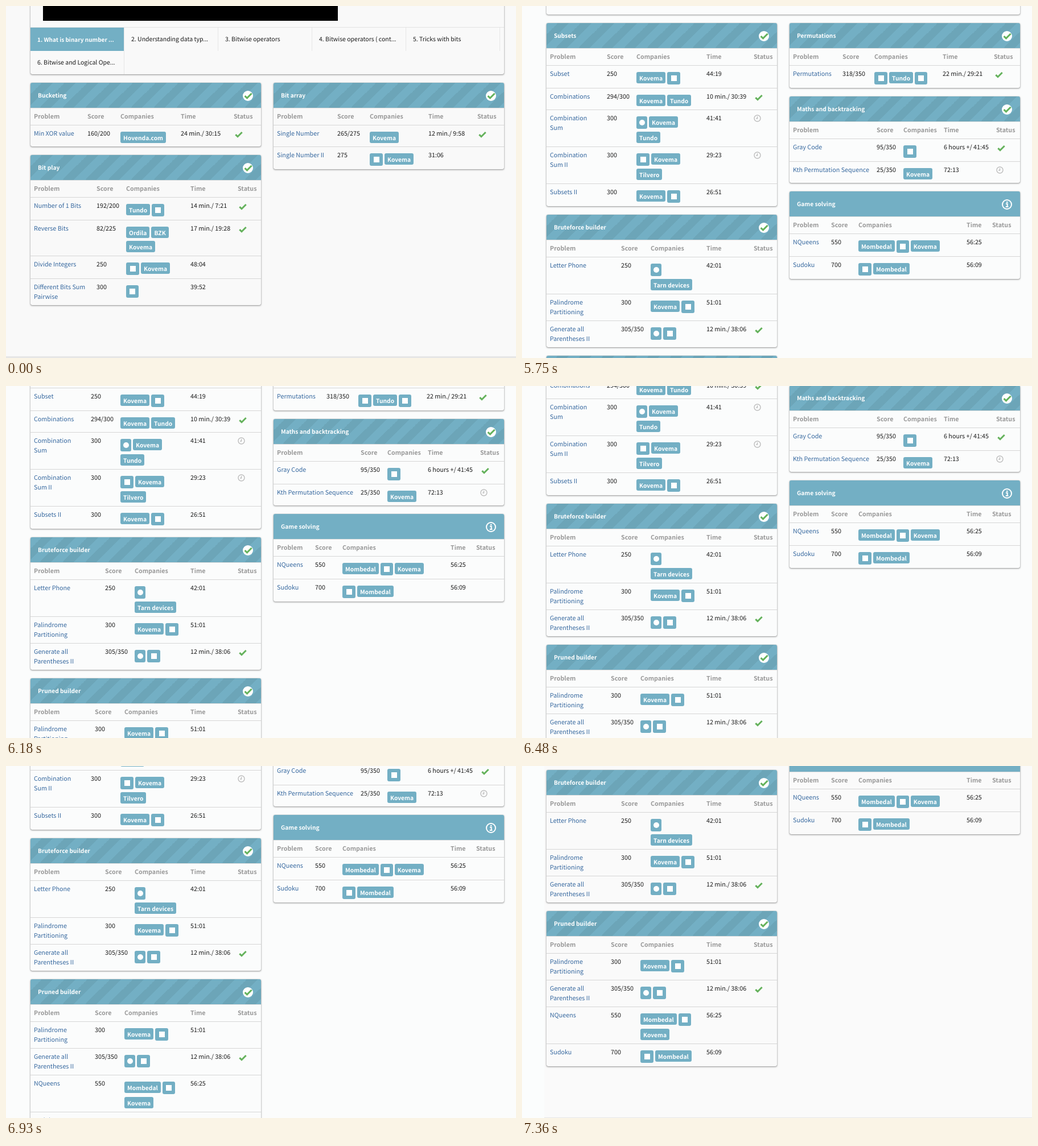
Write an HTML page that moves like this. It is 896 px wide and 619 px high and loops after 8 s.

```html
<!DOCTYPE html>
<html lang="en">
<head>
<meta charset="utf-8">
<title>Practice problems</title>
<style>
html, body { margin: 0; width: 100%; height: 100%; overflow: hidden; }
body {
  position: relative; color: #1a1a1a; white-space: nowrap;
  font: 10.74px/17px "Noto Sans CJK JP", "Noto Sans CJK SC", "Noto Sans CJK", "Open Sans", sans-serif;
  text-rendering: geometricPrecision;
}
.scene, .col, .box, .bar { position: absolute; }
.scene { left: 0; top: 0; width: 896px; height: 619px; }
.col { width: 405px; }
.left { left: 43px; }
.right { left: 470px; }
.box, .panel { border-radius: 3px; box-shadow: 0 0 1px rgba(0,0,0,.45), 0 1px 3px rgba(0,0,0,.4); }
.panel { margin-bottom: 15px; }
.title {
  position: relative; height: 44px; padding-left: 13px; border-radius: 3px 3px 0 0;
  background-color: #73afc4; color: #fff; font-weight: 700; font-size: 10.2px; line-height: 44px;
}
.striped {
  background-image: linear-gradient(-45deg, rgba(0,0,0,.06) 25%, transparent 25% 50%, rgba(0,0,0,.06) 50% 75%, transparent 75%);
  background-size: 40px 40px;
}
.title svg { position: absolute; right: 13px; top: 13px; }
svg { display: block; fill: none; }
.row, .head { display: grid; align-items: start; }
.row { border-top: 1px solid #d6d6d6; }
.head {
  box-sizing: border-box; height: 30px; border-top: 1px solid #ddd;
  color: #999; font-weight: 700; line-height: 30px;
}
.row > div { padding: 6px 0; }
.row > div:first-child, .head > div:first-child { padding-left: 6px; }
.link, .row > div:first-child { color: #36689f; }
.row > .tags { padding: 11px 0 1px; }
.line { display: flex; align-items: flex-start; gap: 3px; padding-bottom: 5px; }
.tag {
  height: 20px; padding: 0 5px; border-radius: 3px; background: #73afc4;
  color: #fff; font-weight: 700; font-size: 10.3px; line-height: 21px;
}
.icon { height: 22px; border-radius: 3px; background: #73afc4; display: grid; place-items: center; }
.icon i { width: 10px; height: 10px; background: #fff; }
.row > .status { padding: 0; }
.status .check { margin: 10px 0 0 2px; }
.status .clock { margin-top: 8px; }
.tabs { position: absolute; left: 0; top: 37px; width: 832px; border-top: 1px solid #e3e3e3; display: flex; flex-wrap: wrap; }
.tabs div { box-sizing: border-box; width: 165px; height: 41px; padding-left: 12px; border-right: 1px solid #e6e6e6; font-size: 10.5px; line-height: 41px; }
.tabs .on { background: #73afc4; color: #fff; font-weight: 700; font-size: 10px; }
.tabs .edge { width: 5px; padding: 0; }
.bar { background: #e6e6e6; height: 3px; }
.link { position: absolute; left: 12px; bottom: 9px; }
</style>
</head>
<body>
<div class="scene" id="intro">
  <div class="box" style="left:43px;top:-20px;width:832px;height:140px"></div>
  <div class="bar" style="left:65px;top:0;width:518px;height:26px;background:#000"></div>
  <div class="tabs" style="left:43px">
    <div class="on">1. What is binary number ...</div><div>2. Understanding data typ...</div><div>3. Bitwise operators</div><div>4. Bitwise operators ( cont...</div><div>5. Tricks with bits</div><div class="edge" style="border:0"></div><div>6. Bitwise and Logical Ope...</div>
  </div>
  <div class="col left" style="top:135px"></div>
  <div class="col right" style="top:135px"></div>
  <div class="bar" style="left:0;top:616px;width:896px"></div>
</div>
<div class="scene" id="list">
  <div class="box" style="left:43px;top:-40px;width:832px;height:95px"></div>
  <div class="box" style="left:53px;top:-30px;width:257px;height:60px"><span class="link">Modular Expression</span></div>
  <div class="box" style="left:330px;top:-30px;width:257px;height:60px"><span class="link" style="left:13px">Reverse Link List Recursion</span></div>
  <div class="col left" style="top:70px"></div>
  <div class="col right" style="top:70px"></div>
  <div class="bar" style="left:39px;top:1018px;width:857px"></div>
</div>
<script>
const CHECK = '<svg class="check" width="14" height="12"><path d="M1.3 6.2L5 9.7L12.7 2" stroke="#65b25c" stroke-width="3"/></svg>';
const CLOCK = '<svg class="clock" width="13" height="13"><g stroke="#bdbdbd" stroke-width="1.4"><circle cx="6.5" cy="6.5" r="5.5"/><path d="M6.5 3.3V7H4.2"/></g></svg>';
const DONE = '<svg width="20" height="20"><circle cx="10" cy="10" r="9" fill="#fff"/><path d="M4.6 10.2L8.5 13.9L16.6 5.8" stroke="#65b25c" stroke-width="3"/></svg>';
const INFO = '<svg width="20" height="20"><circle cx="10" cy="10" r="8" stroke="#fff" stroke-width="2"/><path d="M8 8.8H10.7V14M7.8 14H12.4M9 5.9H11.4" stroke="#fff" stroke-width="2"/></svg>';
const STATUS = { done: CHECK, later: CLOCK };

// A number stands for an icon badge of that width.
const badge = s => +s
  ? `<span class="icon" style="width:${s}px"><i style="border-radius:${s < 22 ? 5 : 0}px"></i></span>`
  : `<span class="tag">${s}</span>`;

const tagLines = s => s.split('|').map(l => `<div class="line">${l.split(',').map(badge).join('')}</div>`).join('');

// Each row: problem; score; badges; time; status. A bar breaks the line.
function row(text) {
  const [name, score, tags, time, status] = text.split(';');
  return `<div>${name.replace('|', '<br>')}</div><div>${score}</div><div class="tags">${tagLines(tags)}</div>` +
    `<div>${time}</div><div class="status">${STATUS[status] || ''}</div>`;
}

function addPanel(column, title, cols, rows, open) {
  const grid = cols.map((x, i) => x - (cols[i - 1] || 0) + 'px').join(' ') + ' 1fr';
  const line = (cls, html) => `<div class="${cls}" style="grid-template-columns:${grid}">${html}</div>`;
  const heads = ['Problem', 'Score', 'Companies', 'Time', 'Status'].map(h => `<div>${h}</div>`).join('');
  document.querySelector(column).insertAdjacentHTML('beforeend',
    `<div class="panel"><div class="title ${open ? '' : 'striped'}">${title}${open ? INFO : DONE}</div>` +
    line('head', heads) + rows.map(r => line('row', row(r))).join('') + '</div>');
}

addPanel('#intro .left', 'Bucketing', [100, 158, 264, 357], [
  'Min XOR value;160/200;Hovenda.com;24 min./ 30:15;done']);
addPanel('#intro .left', 'Bit play', [116, 168, 281, 364], [
  'Number of 1 Bits;192/200;Tundo,22;14 min./ 7:21;done',
  'Reverse Bits;82/225;Ordila,BZK|Kovema;17 min./ 19:28;done',
  'Divide Integers;250;23,Kovema;48:04;',
  'Different Bits Sum|Pairwise;300;22;39:52;']);
addPanel('#intro .right', 'Bit array', [112, 169, 272, 358], [
  'Single Number;265/275;Kovema;12 min./ 9:58;done',
  'Single Number II;275;23,Kovema;31:06;']);

const palindrome = 'Palindrome|Partitioning;300;Kovema,23;51:01;';
const parentheses = 'Generate all|Parentheses II;305/350;19,23;12 min./ 38:06;done';
const sudoku = 'Sudoku;700;23,Mombedal;56:09;';

addPanel('#list .left', 'Subsets', [106, 158, 281, 364], [
  'Subset;250;Kovema,23;44:19;',
  'Combinations;294/300;Kovema,Tundo;10 min./ 30:39;done',
  'Combination|Sum;300;19,Kovema|Tundo;41:41;later',
  'Combination|Sum II;300;23,Kovema|Tilvero;29:23;later',
  'Subsets II;300;Kovema,23;26:51;']);
addPanel('#list .left', 'Bruteforce builder', [131, 183, 281, 364], [
  'Letter Phone;250;19|Tarn devices;42:01;', palindrome, parentheses]);
addPanel('#list .left', 'Pruned builder', [113, 165, 281, 364], [
  palindrome, parentheses, 'NQueens;550;Mombedal,22|Kovema;56:25;', sudoku]);
addPanel('#list .right', 'Permutations', [93, 149, 269, 359], [
  'Permutations;318/350;23,Tundo,22;22 min./ 29:21;done']);
addPanel('#list .right', 'Maths and backtracking', [153, 200, 271, 363], [
  'Gray Code;95/350;23;6 hours +/ 41:45;done',
  'Kth Permutation Sequence;25/350;Kovema;72:13;later']);
addPanel('#list .right', 'Game solving', [73, 121, 311, 356], [
  'NQueens;550;Mombedal,22,Kovema;56:25;', sudoku], true);

const LOOP = 8000, LIST_AT = 500, END_AT = 7360;
// [time, scroll offset]
const scrolls = [[0, 0], [5750, 40], [5890, 80], [6040, 120], [6180, 141], [6330, 160], [6480, 200],
  [6630, 240], [6930, 280], [7070, 320], [7210, 360], [END_AT, 400]];
const intro = document.getElementById('intro'), list = document.getElementById('list');

function draw(now) {
  const t = now % LOOP;
  const inList = t >= LIST_AT;
  intro.style.display = inList ? 'none' : 'block';
  list.style.display = inList ? 'block' : 'none';
  list.style.top = -scrolls.findLast(s => s[0] <= t)[1] + 'px';
  document.body.style.background = !inList ? '#f9f9f9'
    : t < END_AT ? '#fbfcfc' : 'linear-gradient(90deg, #fbfdfd 39px, #fafafa 0)';
}
function frame() {
  draw(performance.now());
  requestAnimationFrame(frame);
}
frame();
</script>
</body>
</html>
```
